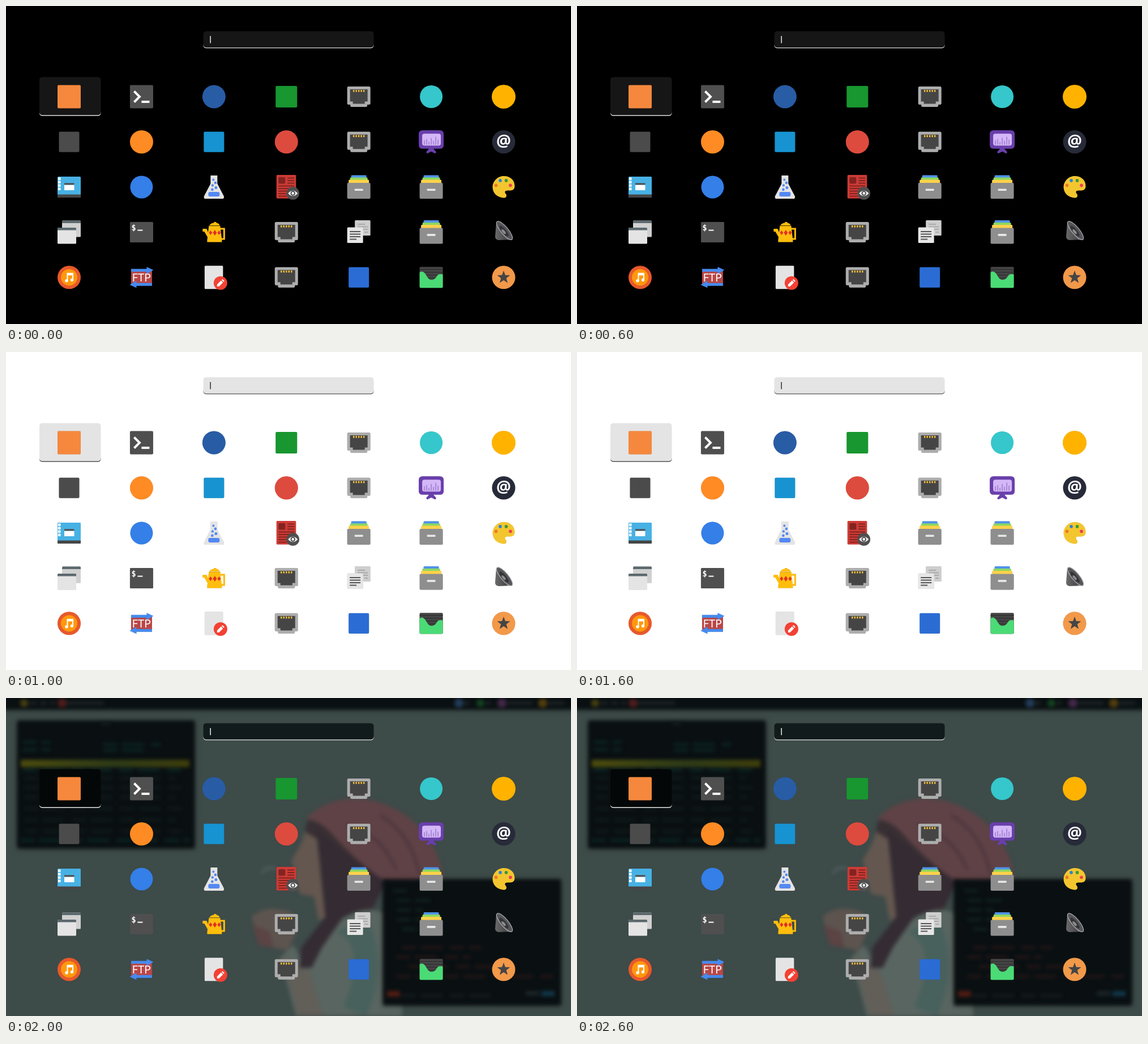
Animation, 998 px wide and 561 px high, one loop 3000 ms. Source, as an HTML page:

```html
<!DOCTYPE html>
<html lang="en">
<head>
<meta charset="utf-8">
<title>App launcher themes</title>
<style>
  html, body { margin: 0; width: 100%; height: 100%; overflow: hidden; background: #000; }
  svg { display: block; width: 998px; height: 561px; }
  .theme { animation: show 3s step-end infinite; }
  .light { animation-delay: -2s; }
  .wall { animation-delay: -1s; }
  @keyframes show {
    0% { visibility: visible; }
    33.3333%, 100% { visibility: hidden; }
  }
  .dark { --fill: #161616; --cell: #161616; --edge: #dcdcdc; --caret: #fff; }
  .light { --fill: #e4e4e4; --cell: #e4e4e4; --edge: #555; --caret: #222; }
  .wall { --fill: #121b1b; --cell: #040707; --edge: #e8e8e8; --caret: #fff; }
  .edge { fill: var(--edge); }
  .field { fill: var(--fill); }
  .cell { fill: var(--cell); }
  .caret { fill: var(--caret); }
  .blur { filter: blur(3.5px); }
  .window { filter: blur(3px) drop-shadow(0 1px 5px rgba(0, 0, 0, .4)); }
  .soft { filter: blur(3px); }
  #icons { filter: drop-shadow(0 .8px 0 rgba(0, 0, 0, .2)); }
  text { font-family: "Noto Sans", sans-serif; fill: #fff; }
</style>
</head>
<body>
<svg viewBox="0 0 998 561">
  <defs>
    <g id="panels">
      <rect class="edge" x="348.5" y="64.5" width="301" height="10" rx="5"/>
      <rect class="field" x="348.5" y="44.5" width="301" height="28.8" rx="5"/>
      <rect class="caret" x="360.4" y="53" width="1.4" height="12.5"/>
      <rect class="edge" x="59" y="184" width="108.500" height="10" rx="5"/>
      <rect class="cell" x="59" y="125.5" width="108.5" height="67" rx="5"/>
    </g>
    <g id="port">
      <path fill="#adadad" d="M-18-18h36q2.500 0 2.500 2.500v27q0 2.500-2.500 2.500h-3v1.500q0 2.500-2.500 2.500h-25q-2.500 0-2.500-2.500V14h-3q-2.500 0-2.500-2.500v-27q0-2.500 2.500-2.500z"/>
      <path fill="#454545" d="M-15.500-13h31V8.500h-5v4h-21v-4h-5z"/>
      <path stroke="#f8c23a" stroke-width="2.400" d="M-9-12v3.500m4.500-3.500v3.500M0-12v3.500m4.500-3.500v3.500M9-12v3.500"/>
    </g>
    <g id="files">
      <rect x="-13.500" y="-21" width="27" height="8" rx="1.500" fill="#4f93ea"/>
      <rect x="-15.500" y="-17" width="31" height="8" rx="1.500" fill="#8dd75f"/>
      <rect x="-18" y="-13" width="36" height="10" rx="1.500" fill="#ffd24b"/>
      <rect x="-20.500" y="-7.500" width="41" height="28" rx="2" fill="#8e8e8e"/>
      <rect x="-7.500" y="3" width="15" height="3.600" rx="1" fill="#e8e8e8"/>
    </g>
    <linearGradient id="metal" x2="1">
      <stop stop-color="#6a6a6a"/><stop offset=".6" stop-color="#4b4b4e"/><stop offset="1" stop-color="#a5a5a8"/>
    </linearGradient>
    <linearGradient id="barLine" x2="1">
      <stop stop-color="#4c4c0d"/><stop offset=".55" stop-color="#2f3c18"/><stop offset="1" stop-color="#3f3f0b"/>
    </linearGradient>
  </defs>

  <g class="theme dark">
    <rect width="998" height="561"/>
    <use href="#panels"/>
  </g>

  <g class="theme light">
    <rect width="998" height="561" fill="#fff"/>
    <use href="#panels"/>
  </g>

  <g class="theme wall">
    <rect width="998" height="561" fill="#3d4b49"/>
    <g class="blur">
      <path fill="#382f33" d="M534 214C520 236 540 290 556 330L600 400 650 370 672 318 640 250z"/>
      <path fill="#64574f" d="M528 236C524 258 512 272 504 287L510 302 508 318 520 346 544 350 552 392 584 384 574 300 552 250z"/>
      <path fill="#5d544f" d="M434 385Q462 362 504 378L514 410 498 446 446 434z"/>
      <path fill="#5c4344" d="M436 400 466 412 472 440 446 436z"/>
      <path fill="#596560" d="M554 430C596 366 664 358 694 400L700 561H512L484 458 508 436 530 478z"/>
      <path fill="#48615d" d="M584 412Q640 440 596 545L636 561Q676 480 640 390z"/>
      <path fill="#625e58" d="M488 452 536 484 560 561H516z"/>
      <path fill="#342b33" d="M548 232C590 270 630 300 680 318L646 364 596 386 558 440 540 476 518 476 522 440 564 386z"/>
      <path fill="#5f4246" d="M530 214C548 190 588 174 630 178 700 186 764 240 774 326L676 326C646 310 606 274 574 238 560 222 546 216 530 214z"/>
      <path fill="none" stroke="#4f383f" stroke-width="6" d="M600 224Q660 236 690 304M660 206Q716 240 730 310"/>
      <path fill="none" stroke="#526260" stroke-width="4" d="M452 310Q460 294 478 302"/>
    </g>
    <g class="window" fill="#0a1012">
      <rect x="-10" y="-10" width="1018" height="30"/>
      <rect x="20" y="40" width="313" height="225"/>
      <rect x="666" y="320" width="314" height="222"/>
    </g>
    <g class="soft">
      <rect x="26" y="109" width="298" height="13" fill="url(#barLine)"/>
      <g fill="none" stroke-width="4" stroke-dasharray="24 9 38 14">
        <path stroke="#0b2929" d="M30 78H78M172 82H272M30 91H78M172 92H245M30 127H318M26 251H324"/>
        <path stroke="#111b1c" d="M32 141H300M32 158H310M32 175H300M32 195H312M32 215H300M32 235H310"/>
        <path stroke="#122421" d="M684 340H708M690 357H750M690 374H736M690 391H760M700 408H770"/>
        <path stroke="#2b1617" d="M700 440H840M690 457H820M710 474H860M690 491H966"/>
        <path stroke="#192022" d="M700 525H860M168 46H184"/>
      </g>
      <path fill="#1d2325" d="M42 6h12v6H42zm18 0h12v6H60zm18 0h8v6h-8zm29 0h66v6h-66zm702 0h10v6h-10zm39 0h8v6h-8zm38 0h44v6h-44zm72 0h28v6h-28z"/>
      <g opacity=".75">
        <circle cx="32" cy="9" r="7" fill="#5a4e12"/>
        <circle cx="99" cy="9" r="8" fill="#672020"/>
        <circle cx="800" cy="9" r="8" fill="#2b4b72"/>
        <circle cx="838" cy="9" r="7" fill="#195326"/>
        <circle cx="876" cy="9" r="8" fill="#57305c"/>
        <circle cx="948" cy="9" r="8" fill="#6b4e0c"/>
        <rect x="673" y="517" width="23" height="10" fill="#6a2115"/>
        <rect x="918" y="517" width="24" height="8" fill="#202b2f"/>
        <rect x="946" y="517" width="23" height="9" fill="#14455c"/>
      </g>
    </g>
    <use href="#panels"/>
  </g>

  <g id="icons">
    <g><rect x="-20.500" y="-20.500" width="41" height="41" rx="2" fill="#f5883d"/></g>
    <g>
      <rect x="-20.500" y="-20.500" width="41" height="41" rx="2" fill="#4f4f4f"/>
      <path fill="none" stroke="#fff" stroke-width="4" d="M-13-9.500-3.500 0-13 9.500M0 9H14"/>
    </g>
    <g><circle r="20.500" fill="#285ca5"/></g>
    <g><rect x="-19" y="-19" width="38" height="38" rx="2" fill="#189630"/></g>
    <g><use href="#port"/></g>
    <g><circle r="20" fill="#35c7cb"/></g>
    <g><circle r="21" fill="#ffb300"/></g>

    <g><rect x="-18" y="-18" width="36" height="36" rx="2" fill="#4b4b4b"/></g>
    <g><circle r="20.500" fill="#ff8b24"/></g>
    <g><rect x="-18" y="-18" width="36" height="36" rx="2" fill="#1793d1"/></g>
    <g><circle r="20.500" fill="#dd4b3e"/></g>
    <g><use href="#port"/></g>
    <g>
      <path fill="#693fab" d="M-15-20.500H15Q22-20.500 22-14V6Q22 12 15 12H4L9 18 7 20.500 0 17-7 20.500-9 18-4 12H-15Q-22 12-22 6V-14Q-22-20.500-15-20.500z"/>
      <rect x="-16" y="-14.500" width="33" height="21" rx="4" fill="#d4b7f7"/>
      <path stroke="#a988d8" stroke-width="2" d="M-12 5V-3m4 8V-5m4 10V0m4 5V-7M4 5V-2M8 5V-9m4 14V-4"/>
    </g>
    <g>
      <circle r="20.500" fill="#272a38"/>
      <text y="8" font-size="29" font-weight="600" text-anchor="middle">@</text>
    </g>

    <g>
      <rect x="-20.500" y="-18.500" width="41" height="37" rx="1.500" fill="#48b1e4"/>
      <path fill="#454545" d="M-20.500 13h41v4q0 1.500-1.500 1.500h-38q-1.500 0-1.500-1.500z"/>
      <path fill="#fff" d="M-19.500-17h4.500v4.500h-4.500zm0 6h4.500v4.500h-4.500zm0 6h4.500v4.500h-4.500zm0 6h4.500v4.500h-4.500zM-8.500-4H9V5.500H-8.500z"/>
      <path fill="#4f4f4f" d="M-8.500-7H9v3H-8.500z"/>
    </g>
    <g><circle r="20" fill="#347fe8"/></g>
    <g>
      <path fill="#e4e4e4" d="M-6-20.500H6V-6L17.500 16Q18.500 20.500 15 20.500H-15Q-18.500 20.500-17.500 16L-6-6z"/>
      <rect x="-10" y="8.500" width="20" height="8" rx="3" fill="#5488f2"/>
      <g fill="#5488f2"><circle cx="-1" cy="-13" r="2"/><circle cx="2.500" cy="-7.500" r="2.300"/><circle cx="-2.500" cy="-3" r="2.200"/><circle cx="3.500" cy="1" r="2.500"/><circle cx="-3" cy="4.500" r="2.300"/></g>
    </g>
    <g>
      <rect x="-17.500" y="-21.500" width="34.500" height="41.500" rx="1.500" fill="#cd3b35"/>
      <rect x="-14" y="-17.500" width="12" height="11.500" rx="2" fill="#822421"/>
      <path stroke="#822421" stroke-width="2" d="M2-16H14M2-11.500H14M2-7H14M-14-2H14M-14 2.500H14M-14 7H2M-14 11.500H0M-14 16H1"/>
      <circle cx="11.500" cy="11" r="11.300" fill="#4f4f4f"/>
      <path fill="#fff" d="M3 11Q11.500 1.500 20 11 11.500 20.500 3 11z"/>
      <circle cx="11.500" cy="11" r="3.300" fill="#fff" stroke="#4f4f4f" stroke-width="2"/>
    </g>
    <g><use href="#files"/></g>
    <g><use href="#files"/></g>
    <g>
      <path fill="#f3c630" d="M0-19.500C12-19.500 19.500-12 19.500-2 19.500 7 12 6 7 6 2 6 1 9 4 12 6 15 5 19.500 0 19-12 18-19.500 10-19.500 0S-11-19.500 0-19.500z"/>
      <circle cx="-13.500" cy="-3" r="2.800" fill="#ee7721"/>
      <circle cx="-6" cy="-11.500" r="2.800" fill="#2f82d2"/>
      <circle cx="4.500" cy="-11.500" r="2.800" fill="#3a9838"/>
      <circle cx="12" cy="-3" r="2.800" fill="#ed3c55"/>
    </g>

    <g>
      <rect x="-12.500" y="-20.500" width="33" height="29" rx="1.500" fill="#d0d0d0"/>
      <path fill="#5c696e" d="M-12.500-17q0-3.500 1.500-3.500H19q1.500 0 1.500 1.500v3h-33z"/>
      <rect x="-20.500" y="-8" width="33" height="28.500" rx="1.500" fill="#e4e4e4"/>
      <path fill="#5c696e" d="M-20.500-6q0-2 1.500-2H11q1.500 0 1.500 1.500v3h-33z"/>
    </g>
    <g>
      <rect x="-20.500" y="-18" width="41" height="36" rx="1.500" fill="#4f4f4f"/>
      <text x="-18" y="-3.500" font-size="13.500" font-weight="700" style="font-family:'DejaVu Sans Mono',monospace">$</text>
      <path fill="#fff" d="M-7-4.500h9v2h-9z"/>
    </g>
    <g>
      <path fill="none" stroke="#ffbe0d" stroke-width="3" d="M10-6H18V12H10"/>
      <path fill="#ffbe0d" d="M-20-6H-13L-10 1V11L-17-1H-20zM-9-11H11L14 14V17.500H-12V14zM-8-12Q-6-16 0-16.500V-18H4V-16.500Q9-16 10-12z"/>
      <path fill="none" stroke="#d99c00" d="M-9-11H11"/>
      <path fill="#e23125" d="M-6-3 -3 1-6 5-9 1zM1.500-4 5 1 1.500 6-2 1zM9-3 12 1 9 5 6 1z"/>
    </g>
    <g><use href="#port"/></g>
    <g>
      <rect x="-7" y="-21" width="27.500" height="27" rx="1.500" fill="#cecece"/>
      <path stroke="#aaa" stroke-width="2" d="M-2-14H11M-2-9.500H16M4-5H16M10 0H16"/>
      <rect x="-20.500" y="-8.500" width="28" height="27.500" rx="1.500" fill="#e6e6e6"/>
      <path stroke="#555" stroke-width="2" d="M-16-1H3M-16 3.500H3M-16 8H3M-16 12.500H-4"/>
    </g>
    <g><use href="#files"/></g>
    <g>
      <path fill="url(#metal)" d="M-13-18-15 8Q-15 13-9 14L16 13z"/>
      <ellipse cx="1.500" cy="-3" rx="20.500" ry="6.500" transform="rotate(50 1.500 -3)" fill="#56565a" stroke="#b0b0b4" stroke-width="1.200"/>
      <ellipse cx=".5" cy="-2" rx="12" ry="3.800" transform="rotate(50 .5 -2)" fill="#353538"/>
      <ellipse cx="0" cy="-1" rx="5" ry="2.200" transform="rotate(50 0 -1)" fill="#8d8d91"/>
    </g>

    <g>
      <circle r="20.500" fill="#e7592b"/>
      <circle r="14.500" fill="#ff980d"/>
      <path fill="#fff" d="M-4-8H7.500V5H5.500V-3.500H-2V7H-4z"/>
      <circle cx="-4.500" cy="6" r="2.700" fill="#fff"/><circle cx="5" cy="4.500" r="2.700" fill="#fff"/>
    </g>
    <g>
      <rect x="-18.500" y="-14" width="37" height="28" fill="#b94747"/>
      <path fill="#458bf0" d="M-18.500-15H9V-18.500L21-13 9-6V-10H-18.500zM18.500 15H-9V18.500L-21 13-9 6V10H18.500z"/>
      <text y="7" font-size="20" font-weight="500" text-anchor="middle">FTP</text>
    </g>
    <g>
      <rect x="-16.500" y="-20.500" width="32.500" height="41" rx="1.500" fill="#e4e4e4"/>
      <circle cx="11.500" cy="10" r="12" fill="#f34134"/>
      <path fill="#fff" d="M5.500 16V12.500L12.500 5.500 16 9 9 16zM13.500 4.500 15 3 18.500 6.500 17 8z"/>
    </g>
    <g><use href="#port"/></g>
    <g><rect x="-18" y="-18" width="36" height="36" rx="2" fill="#2b6cd4"/></g>
    <g>
      <rect x="-20.500" y="-18.500" width="41" height="37" rx="2" fill="#454545"/>
      <path stroke="#303030" stroke-width="1.500" d="M-20.500-14h41M-20.500-9h41M-20.500-4h41M-20.500 1h41"/>
      <path fill="#4adb76" d="M-20.500-9C-16-12-12-10-9-4-5 3-3 5 3 4S9-4 14-5.500Q18-6.500 20.500-5V16.500q0 2-2 2h-37q-2 0-2-2z"/>
    </g>
    <g>
      <circle r="20.500" fill="#f2994a"/>
      <path fill="#454545" d="M0-12 2.900-4 11.400-3.700 4.700 1.500 7.100 9.700 0 5-7.100 9.700-4.700 1.500-11.400-3.700-2.900-4z"/>
    </g>
  </g>
</svg>
<script>
  const cols = 7;
  [...document.getElementById('icons').children].forEach((icon, i) => {
    const x = 111.5 + (i % cols) * 127.92;
    const y = 160 + Math.floor(i / cols) * 79.7;
    icon.setAttribute('transform', `translate(${x} ${y})`);
  });
</script>
</body>
</html>
```
